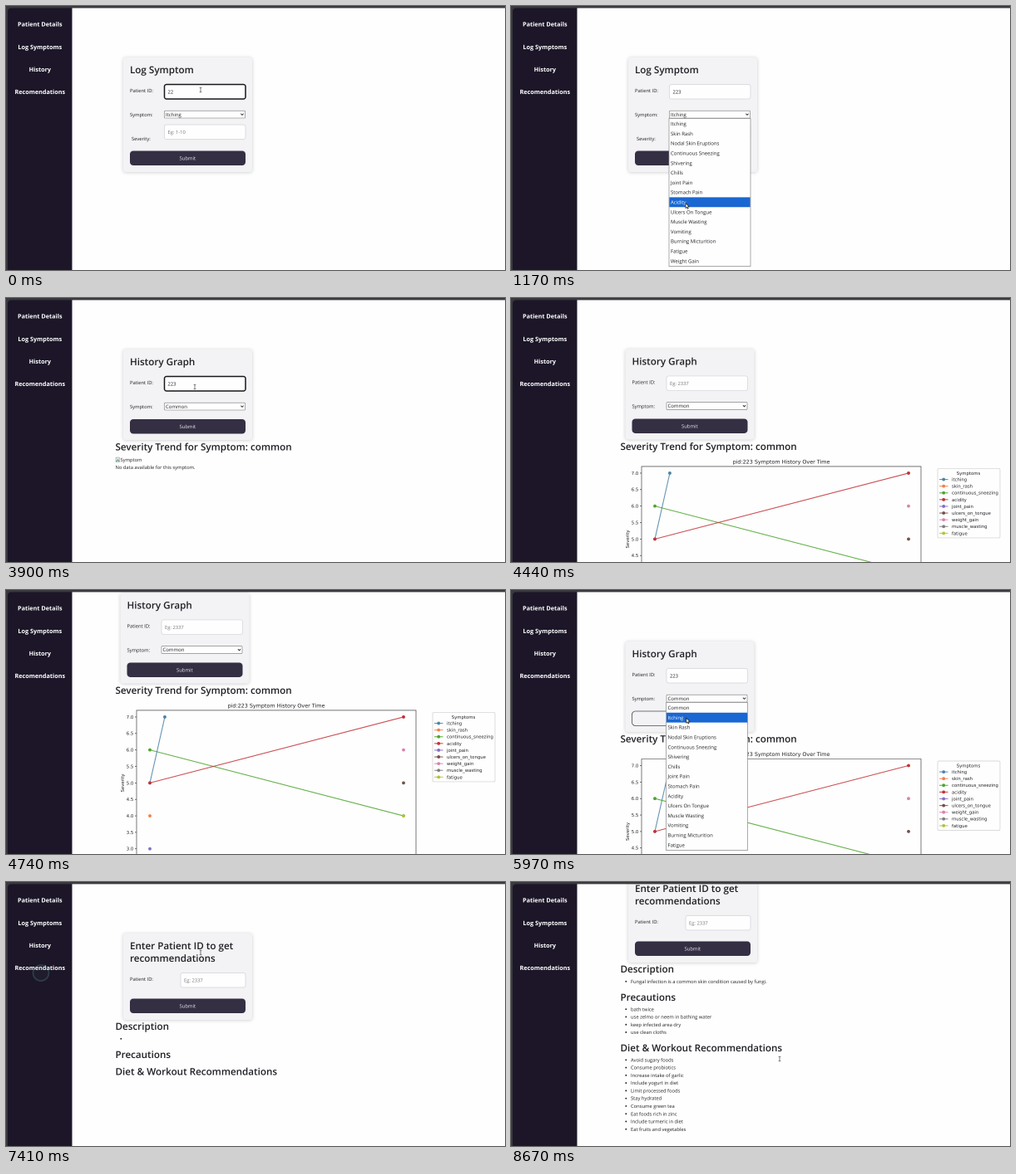
Recreate the animation shown at these times as an HTML page with a canvas. Size 600 px wide and 318 px high, loop 8700 ms.

```html
<!DOCTYPE html>
<html lang="en">
<head>
<meta charset="utf-8">
<title>Symptom log</title>
<style>
html, body { margin: 0; width: 100%; height: 100%; overflow: hidden; background: #fefefe; }
canvas { display: block; width: 600px; height: 318px; }
</style>
</head>
<body>
<canvas id="stage" width="1200" height="636"></canvas>
<script>
const ctx = document.getElementById('stage').getContext('2d');
ctx.scale(2, 2);
ctx.textRendering = 'geometricPrecision';

const LOOP = 8700;
const LAG = 80;        // from press to effect
const KEY = 90;        // time per typed digit
const GLIDE = 200;     // longest pointer move
const RING = 180;      // life of a click ring
const ROW = 11.8;      // height of a dropdown option
const UI = '"Open Sans", "Noto Sans", sans-serif';
const PLOT = '"DejaVu Sans", sans-serif';
const INK = '#1f2025', PURPLE = '#352f44', CARD = '#f3f2f4', PAPER = '#fefefe';

const menu = ['Patient Details', 'Log Symptoms', 'History', 'Recomendations'];
const buttonTop = { log: 174.5, history: 146, advice: 140.5 };
const symptoms = ['Itching', 'Skin Rash', 'Nodal Skin Eruptions', 'Continuous Sneezing', 'Shivering', 'Chills',
  'Joint Pain', 'Stomach Pain', 'Acidity', 'Ulcers On Tongue', 'Muscle Wasting', 'Vomiting',
  'Burning Micturition', 'Fatigue', 'Weight Gain'];
const precautions = ['bath twice', 'use zelmo or neem in bathing water', 'keep infected area dry', 'use clean cloths'];
const diet = ['Avoid sugary foods', 'Consume probiotics', 'Increase intake of garlic', 'Include yogurt in diet',
  'Limit processed foods', 'Stay hydrated', 'Consume green tea', 'Eat foods rich in zinc',
  'Include turmeric in diet', 'Eat fruits and vegetables'];
const colors = {
  itching: '#4c83a8', skin_rash: '#f58149', continuous_sneezing: '#4da52c', acidity: '#c23237', joint_pain: '#8570c2',
  ulcers_on_tongue: '#75504b', weight_gain: '#d983ac', muscle_wasting: '#7f7f7f', fatigue: '#b5c236'
};
const visits = [
  { day: 0, itching: 5, skin_rash: 4, continuous_sneezing: 6, acidity: 5, joint_pain: 3 },
  { day: 1, itching: 7 },
  { day: 17, continuous_sneezing: 4, acidity: 7, ulcers_on_tongue: 5, weight_gain: 6, fatigue: 4 }
];

// What the user does: time, action, target, optional exact spot
const script = [
  [-280, 'click', 'id', 234, 101], [420, 'click', 'symptom'], [930, 'point', 'Acidity'], [1410, 'click', 'Acidity'],
  [1650, 'click', 'severity'], [2210, 'click', 'submit'], [2850, 'click', 'History'], [3400, 'click', 'id'],
  [4180, 'click', 'submit'], [4440, 'point', 'edge'], [5400, 'click', 'id'], [5780, 'click', 'symptom'],
  [5990, 'click', 'Itching'], [6180, 'click', 'submit'], [6510, 'click', 'id', 213, 96], [6760, 'point', 'edge'],
  [7280, 'click', 'Recomendations'], [7400, 'point', 'title'], [7560, 'click', 'id'], [8050, 'click', 'submit'],
  [8400, 'point', 'text']
];

const clamp = u => Math.min(1, Math.max(0, u));
const smooth = u => u * u * (3 - 2 * u);
const progress = (t, from, to) => clamp((t - from) / (to - from));
const bump = (t, from, to) => Math.sin(Math.PI * progress(t, from, to)) ** 2;
const menuY = i => 22 + i * 27.2;
const choices = page => page === 'history' ? ['Common', ...symptoms.slice(0, 14)] : symptoms;

function clearForm(s) {
  s.id = s.severity = '';
  s.symptom = choices(s.page)[0];
}

function press(s, target, age) {
  const typed = Math.floor(age / KEY);
  s.focus = target;
  s.open = target === 'symptom';
  if (target === 'id') s.id = '223'.slice(0, typed);
  else if (target === 'severity') s.severity = '7'.slice(0, typed);
  else if (symptoms.includes(target)) s.symptom = target;
  else if (target === 'submit') {
    s.result = s.page === 'log' ? '' : s.symptom;
    clearForm(s);
  } else if (menu.includes(target)) {
    s.page = target === 'History' ? 'history' : 'advice';
    s.result = '';
    clearForm(s);
  }
}

function stateAt(t) {
  const s = { page: 'log', result: '', focus: '', open: false };
  clearForm(s);
  for (const [time, action, target] of script) {
    const age = t - time - LAG;
    if (action === 'click' && age >= 0) press(s, target, age);
  }
  return s;
}

function spotOf(target, page) {
  const option = choices(page).indexOf(target);
  if (option >= 0) return [210, 136 + (option + 0.6) * ROW];
  if (menu.includes(target)) return [42, menuY(menu.indexOf(target)) + 6];
  return {
    id: [227, page === 'advice' ? 118 : 107], symptom: [240, 131], severity: [240, 152],
    submit: [187, buttonTop[page] + 15.5], edge: [606, 150], title: [234, 85], text: [323, 213]
  }[target];
}

const stops = script.map(([time, action, target, px, py]) => {
  const [x, y] = px ? [px, py] : spotOf(target, stateAt(time).page);
  return { time, action, x, y };
});

function mouseAt(t) {
  const a = stops.filter(p => p.time <= t).pop();
  const b = stops.find(p => p.time > t) || a;
  const u = a === b ? 0 : smooth(progress(t, Math.max(a.time + 20, b.time - GLIDE), b.time));
  return { x: a.x + (b.x - a.x) * u, y: a.y + (b.y - a.y) * u };
}

const scrollAt = t => 59 * (bump(t, 4420, 5100) + bump(t, 6740, 7200)) + 69 * smooth(progress(t, 8430, 8640));

// y is the middle of the capitals
function text(str, x, y, size = 5.8, { color = INK, weight = 400, align = 'left', font = UI } = {}) {
  ctx.font = `${weight} ${size}px ${font}`;
  ctx.textAlign = align;
  ctx.fillStyle = color;
  ctx.fillText(str, x, y + size * 0.36);
}

const heading = (str, x, y) => text(str, x, y, 11.65, { weight: 600 });
const label = (str, x, y, align = 'left', size = 5.35) => text(str, x, y, size, { font: PLOT, align });

function box(x, y, w, h, r, fill, stroke, width = 0.7) {
  ctx.beginPath();
  ctx.roundRect(x, y, w, h, r);
  if (fill) { ctx.fillStyle = fill; ctx.fill(); }
  if (stroke) { ctx.strokeStyle = stroke; ctx.lineWidth = width; ctx.stroke(); }
}

function line(points, color, width = 0.6) {
  ctx.beginPath();
  points.forEach(([x, y]) => ctx.lineTo(x, y));
  ctx.strokeStyle = color;
  ctx.lineWidth = width;
  ctx.stroke();
}

function dot(x, y, r, color) {
  ctx.beginPath();
  ctx.arc(x, y, r, 0, 7);
  ctx.fillStyle = color;
  ctx.fill();
}

function circle(x, y, r, color, width) {
  ctx.beginPath();
  ctx.arc(x, y, r, 0, 7);
  ctx.strokeStyle = color;
  ctx.lineWidth = width;
  ctx.stroke();
}

function card(h) {
  ctx.save();
  ctx.shadowColor = 'rgba(0,0,0,.2)';
  ctx.shadowBlur = 9;
  ctx.shadowOffsetY = 1;
  box(141, 62, 155, h, 3, CARD);
  ctx.restore();
}

function input(x, y, value, hint, focused) {
  box(x, y, 288 - x, 17.5, 2.5, PAPER, focused ? '#17171c' : '#d3d2da', focused ? 1.5 : 0.7);
  text(value || hint, x + 4, y + 9, 5.8, { color: value ? INK : '#77777d' });
}

function select(value) {
  box(190.5, 126.2, 97, 8.8, 0.8, PAPER, '#767676', 0.6);
  text(value, 192, 130.6, 6);
  line([[282.4, 129.7], [284, 131.4], [285.6, 129.7]], '#222', 0.9);
}

function submit(page, mouse) {
  const y = buttonTop[page];
  const hover = mouse.x > 149 && mouse.x < 288 && mouse.y > y && mouse.y < y + 17.5;
  box(149, y, 139, 17.5, 4, hover ? CARD : PURPLE, hover && '#4b4953', 0.8);
  text('Submit', 218.3, y + 9, 5.9, { color: hover ? '#5c5a63' : '#f0eef4', align: 'center' });
}

function options(s, mouse) {
  const names = choices(s.page);
  const over = Math.floor((mouse.y - 136) / ROW);
  const active = over >= 0 ? over : names.indexOf(s.symptom);
  box(190, 135.5, 98, names.length * ROW + 1, 0, PAPER, '#8a8a8a');
  names.forEach((name, i) => {
    const y = 136 + i * ROW;
    if (i === active) box(190.5, y, 97, ROW, 0, '#1967d2');
    text(name, 192, y + ROW / 2, 6, { color: i === active ? '#fff' : INK });
  });
}

// Shared by the logging and history forms
function symptomForm(s, mouse, title, height) {
  card(height);
  heading(title, 149, 77);
  text('Patient ID:', 149, 102);
  text('Symptom:', 149, 131);
  input(190.5, 94.5, s.id, 'Eg: 2337', s.focus === 'id');
  select(s.symptom);
  submit(s.page, mouse);
}

function logPage(s, mouse) {
  symptomForm(s, mouse, 'Log Symptom', 138);
  text('Severity:', 151, 160);
  input(190.5, 143, s.severity, 'Eg: 1-10', s.focus === 'severity');
  if (s.open) options(s, mouse);
}

function historyPage(s, mouse) {
  // A chart makes the page scroll, which nudges the centred form
  const shift = s.result ? -3.5 : 0;
  heading('Severity Trend for Symptom: ' + (s.result || 'Common').toLowerCase(), 131.5, 179.5);
  if (s.result === 'Common') trendChart();
  else if (s.result) barChart();
  else {
    box(132, 192, 4.5, 5.5, 0, '#dfe6ee', '#8b949e', 0.5);
    line([[132.5, 197], [134.5, 194.8], [136.3, 197]], '#4f9a55', 0.9);
    text('Symptom', 137.5, 194.7);
    text('No data available for this symptom.', 131.5, 204);
  }
  ctx.save();
  ctx.translate(shift, 0);
  symptomForm(s, { x: mouse.x - shift, y: mouse.y }, 'History Graph', 109);
  if (s.open) options(s, mouse);
  ctx.restore();
}

function axes(x0, y0, x1, y1, title, from, step, yOf) {
  box(x0, y0, x1 - x0, y1 - y0, 0, null, '#222', 0.6);
  label(title, (x0 + x1) / 2, y0 - 5.7, 'center', 6.4);
  for (let v = from; v <= 7; v += step) {
    line([[x0 - 2, yOf(v)], [x0, yOf(v)]], '#222');
    label(step < 1 ? v.toFixed(1) : v, x0 - 3.7, yOf(v), 'right');
  }
  label('Date', (x0 + x1) / 2, y1 + 16, 'center');
  ctx.save();
  ctx.translate(140, (y0 + y1) / 2);
  ctx.rotate(-Math.PI / 2);
  label('Severity', 0, 0, 'center');
  ctx.restore();
}

function trendChart() {
  const xOf = day => 173 + day * 305 / 17;
  const yOf = v => 211.5 + (7 - v) * 39.7;
  axes(157, 203.5, 493, 378.5, 'pid:223 Symptom History Over Time', 3, 0.5, yOf);
  box(513, 206, 75, 83.5, 1.5, PAPER, '#cfcfcf');
  label('Symptoms', 550, 211.5, 'center');
  Object.entries(colors).forEach(([name, color], i) => {
    const points = visits.filter(v => name in v).map(v => [xOf(v.day), yOf(v[name])]);
    const y = 219.1 + i * 8.1;
    ctx.globalAlpha = 0.85;
    line(points, color, 1.1);
    line([[515, y], [525.5, y]], color, 1.1);
    ctx.globalAlpha = 1;
    [...points, [520.2, y]].forEach(([px, py]) => dot(px, py, 1.9, color));
    label(name, 530, y);
  });
}

function barChart() {
  const yOf = v => 345 - v * 19.2;
  visits.filter(v => v.itching).forEach(({ day, itching }) => {
    const x = 168.4 + day * 262.8;
    box(x, yOf(itching), 64.5, itching * 19.2, 0, '#94cce9');
    line([[x + 32, 345], [x + 32, 347]], '#222');
  });
  axes(152, 204, 512, 345, 'pid: 223 Severity Trend for Symptom: itching', 0, 1, yOf);
}

function bullets(items, top) {
  items.forEach((item, i) => {
    const y = top + i * 9.27;
    dot(138.3, y, 0.95, INK);
    text(item, 144, y);
  });
}

function advicePage(s, mouse) {
  card(104);
  heading('Enter Patient ID to get', 149, 77);
  heading('recommendations', 149, 92);
  text('Patient ID:', 149, 117);
  input(210, 109.5, s.id, 'Eg: 2337', s.focus === 'id');
  submit(s.page, mouse);
  heading('Description', 131.5, 174);
  bullets([s.result && 'Fungal infection is a common skin condition caused by fungi.'], 188.8);
  heading('Precautions', 131.5, 208);
  heading('Diet & Workout Recommendations', 131.5, s.result ? 269 : 228.5);
  if (s.result) {
    bullets(precautions, 222.2);
    bullets(diet, 283.3);
  }
}

function sidebar() {
  box(0, 0, 600, 318, 0, '#3a393e');
  box(79.5, 2.5, 521, 316, 0, PAPER);
  box(2, 2.5, 77.5, 320, [4, 0, 0, 0], '#1c1628');
  menu.forEach((name, i) => text(name, 40.8, menuY(i), 7.25, { color: '#fff', weight: 700, align: 'center' }));
}

function ring(t) {
  const click = stops.find(p => p.action === 'click' && t >= p.time && t < p.time + RING);
  if (!click) return;
  const { x, y } = click;
  const age = (t - click.time) / RING, r = 4.2 + 7.2 * age;
  ctx.globalAlpha = (1 - age) ** 2;
  dot(x, y, r, 'rgba(120,205,180,.4)');
  ctx.globalAlpha = 1 - age;
  circle(x, y, r, '#5aa9a0', 1.7);
  ctx.globalAlpha = bump(age, 0.2, 0.7);
  circle(x, y, r + 1, '#cbd65a', 0.9);
  ctx.globalAlpha = 1;
}

function pointer({ x, y }, s) {
  const inForm = x > 149 && x < 288;
  const overText = inForm && (y > 70 && y < 119 || s.page === 'log' && y > 143 && y < 161) ||
    s.result && s.page === 'advice' && y > 165;
  if (overText && !s.open) {
    line([[x, y - 2.6], [x, y + 2.6]], '#444', 0.7);
    [-2.8, 2.8].forEach(d => line([[x - 1.4, y + d], [x + 1.4, y + d]], '#444', 0.6));
    return;
  }
  ctx.beginPath();
  [[0, 0], [0, 6], [1.4, 4.8], [2.3, 6.8], [3.2, 6.4], [2.4, 4.5], [4.2, 4.4]].forEach(([a, b]) => ctx.lineTo(x + a, y + b));
  ctx.closePath();
  ctx.fillStyle = '#fff';
  ctx.fill();
  ctx.lineWidth = 0.7;
  ctx.strokeStyle = '#222';
  ctx.stroke();
}

const pages = { log: logPage, history: historyPage, advice: advicePage };

function draw(t) {
  const s = stateAt(t), mouse = mouseAt(t), scroll = scrollAt(t);
  sidebar();
  ctx.save();
  ctx.beginPath();
  ctx.rect(80, 2.5, 520, 316);
  ctx.clip();
  ctx.translate(0, -scroll);
  pages[s.page](s, { x: mouse.x, y: mouse.y + scroll });
  ctx.restore();
  ring(t);
  pointer(mouse, s);
}

const start = performance.now();
function tick() {
  draw((performance.now() - start) % LOOP);
  requestAnimationFrame(tick);
}
tick();
</script>
</body>
</html>
```
